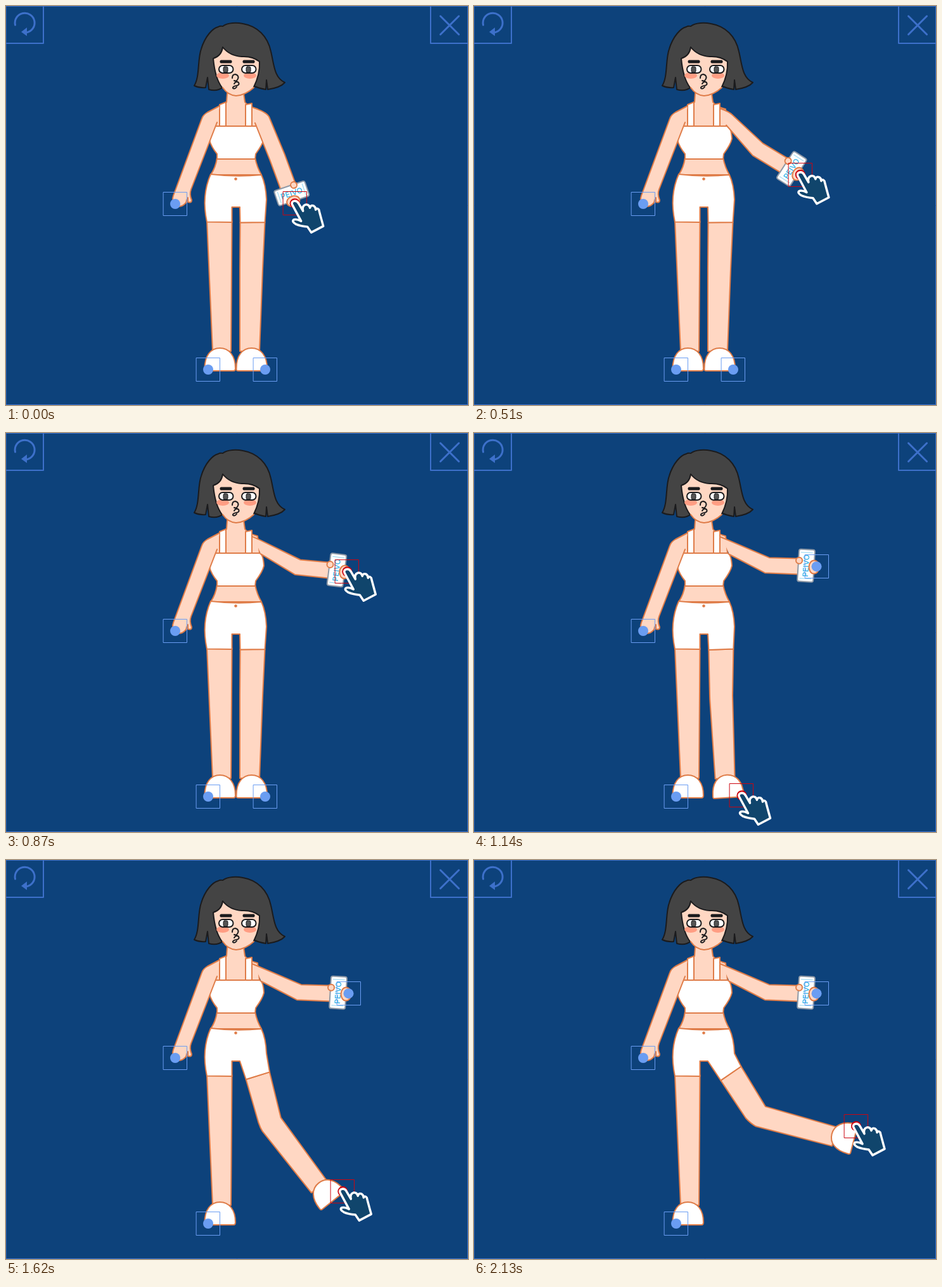
Write an HTML page with a canvas that moves like this. It is 729 px wide and 631 px high and loops after 2580 ms.

```html
<!DOCTYPE html>
<html lang="en">
<head>
<meta charset="utf-8">
<title>Drag the pose</title>
<style>
html, body { margin: 0; width: 100%; height: 100%; overflow: hidden; background: #0d427b; }
canvas { display: block; }
</style>
</head>
<body>
<canvas id="stage" width="729" height="631"></canvas>
<script>
const ctx = document.getElementById('stage').getContext('2d');
const LOOP = 2580, STEP = 30;
const BG = '#0d427b', FRAME = '#3d70ca', LINE = '#df7c48', SKIN = '#ffd7c3';
const HAIR = '#444', INK = '#1b1b1d', BLUE = '#6a9df2', RED = '#cc0510';

// time, first joint angle, second joint angle (degrees)
const ARM = [[0, 67.3, 69.3], [510, 48.9, 30.8], [870, 33.7, 5.1], [960, 30.8, 1.45]];
const LEG = [[1080, 0, 0], [1320, 6.7, 15.4], [1620, 16.5, 38.5], [1890, 25.2, 58.5], [2130, 33.9, 75.5]];
const SHOULDER = [400, 172], UPPER = 72.6, FORE = 78.2;
const HIP = [389.5, 313], KNEE = [387.5, 420], FOOT = [409, 575];

const rad = d => d * Math.PI / 180;
const mix = (a, b, k) => a + (b - a) * k;
const mixPt = (p, q, k) => [mix(p[0], q[0], k), mix(p[1], q[1], k)];

function polar(p, r, deg) {
  return [p[0] + r * Math.cos(rad(deg)), p[1] + r * Math.sin(rad(deg))];
}

function turn(p, from, to, deg) {
  const x = p[0] - from[0], y = p[1] - from[1], c = Math.cos(rad(deg)), s = Math.sin(rad(deg));
  return [to[0] + x * c - y * s, to[1] + x * s + y * c];
}

function pose(keys, t) {
  let i = 0;
  while (i < keys.length - 2 && t > keys[i + 1][0]) i++;
  const a = keys[i], b = keys[i + 1];
  const k = Math.min(1, Math.max(0, (t - a[0]) / (b[0] - a[0])));
  return [mix(a[1], b[1], k), mix(a[2], b[2], k)];
}

function paint(d, fill, line, width = 2) {
  const p = typeof d === 'string' ? new Path2D(d) : d;
  if (fill) { ctx.fillStyle = fill; ctx.fill(p); }
  if (line) { ctx.strokeStyle = line; ctx.lineWidth = width; ctx.stroke(p); }
}

function oval(x, y, rx, ry, fill, line, width) {
  const p = new Path2D();
  p.ellipse(x, y, rx, ry, 0, 0, 7);
  paint(p, fill, line, width);
}

function box(x, y, w, h, r, fill, line, width) {
  const p = new Path2D();
  p.roundRect(x, y, w, h, r);
  paint(p, fill, line, width);
}

function poly(points) {
  const p = new Path2D();
  points.forEach(q => p.lineTo(q[0], q[1]));
  return p;
}

function place(x, y, deg, draw) {
  ctx.save();
  ctx.translate(x, y);
  ctx.rotate(rad(deg));
  draw();
  ctx.restore();
}

function drawFrame() {
  ctx.fillStyle = BG;
  ctx.fillRect(0, 0, 729, 631);
  ctx.strokeStyle = FRAME;
  ctx.lineWidth = 1;
  ctx.strokeRect(.5, .5, 728, 630);
  paint('M0 59H59V0M670 0V59H729', null, FRAME);
  paint('M14.5 30A15.5 15.5 0 1 1 32 42', null, FRAME, 3);
  paint('M24 41L33 34V47.500Z', FRAME);
  paint('M685.500 16L714.500 45M714.500 16L685.500 45', null, FRAME, 3);
}

function drawHead() {
  paint('M297 126C306 112 302 84 308 68C314 48 326 35 335 33C338 31 340 32 342 32C350 26 364 26 374 28' +
    'C397 32 413 48 418 72C423 93 423 113 440 121Q433 129 413 132L411 117L410 132Q398 130 390 126' +
    'L343 128Q333 136 320 132L318 113L315 129Q305 130 297 126Z', HAIR, INK);
  const top = 'M341 129Q330 115 327 83Q340 79 342 65Q353 79 372 80Q389 79 400 88Q401 108 391 128';
  paint(top + 'Q379 142 363 142Q349 140 341 129Z', SKIN);
  paint(top, null, INK);
  paint('M342 129Q350 141 363 142Q378 141 391 129', null, LINE);
  for (const x of [347, 383]) {
    box(x - 9.500, 85.500, 19, 5, 2, INK);
    oval(x < 360 ? 342 : 385, 110, 10, 5, '#ff9d83');
    box(x - 11, 94, 22.500, 12, 6, '#fff', INK, 2);
    box(x - 4, 96, 7, 9, 2, '#555', INK, 1);
  }
  paint('M357 114Q357 108 362 108Q368 110 366 115Q364 120 360 118' +
    'M360 123Q363 118 367 121Q369 125 364 126Q357 127 358 130Q361 132 364 128', null, INK, 2);
}

function drawTorso() {
  paint('M349 138L348 152Q340 158 330 163L324 190H400L397 163Q382 159 377 152L375 138Z', SKIN, LINE);
  for (const x of [337, 378]) paint(`M${x} 156V191H${x + 10}V${x < 350 ? 152 : 154}Z`, '#fff', LINE);
  paint('M333 240Q331 255 323 267H403Q396 255 393 240Z', SKIN, LINE);
  paint('M330 190H400Q406 192 407 210Q405 219 394 234L393 242H333V234Q324 223 321 212Z', '#fff', LINE);
}

function drawLeftArm() {
  const d = 'M337 158L318 168Q311 172 309 178L264 300Q261 308 267 314Q275 321 284 311Q285 306 287 303' +
    'L287 310Q293 312 293 307Q289 298 292 290L333 184';
  paint(d, SKIN, LINE);
}

function shoe(dx, dy) {
  ctx.save();
  ctx.translate(dx, dy);
  paint('M363.500 573Q363 577 366 577H409Q412 577 412 573C412 553 402 541 387.500 541' +
    'C373 541 363.500 553 363.500 573Z', '#fff', LINE);
  ctx.restore();
}

function drawLegs([thigh, shin]) {
  paint('M317 340L326 546H355L356.500 340Z', SKIN, LINE);
  shoe(-50, 0);
  const knee = turn(KNEE, HIP, HIP, -thigh);
  const upper = (x, y) => turn([x, y], HIP, HIP, -thigh);
  const lower = (x, y) => turn([x, y], KNEE, knee, -shin);
  const hemOut = upper(408.500, 342), hemIn = upper(369.500, 342.500);
  const leg = poly([hemOut, upper(405, 416), lower(400, 546), lower(369, 546), lower(369, 422)]);
  leg.quadraticCurveTo(...mixPt(upper(369, 420), lower(369, 418), .5), ...upper(369, 414));
  leg.lineTo(...hemIn);
  leg.closePath();
  paint(leg, SKIN, LINE);
  place(knee[0], knee[1], -shin, () => shoe(-KNEE[0], -KNEE[1]));
  const shorts = new Path2D('M356.500 318V342L317 341.500Q308 300 323 266Q363 271 403 267Q410 282 411 306');
  shorts.lineTo(...hemOut);
  shorts.lineTo(...hemIn);
  shorts.lineTo(369, 318);
  shorts.closePath();
  paint(shorts, '#fff', LINE);
  oval(362.500, 273.500, 2.300, 2.300, LINE);
  return lower(...FOOT);
}

function drawPhoneHand() {
  place(-16.500, -1, 2, () => {
    box(-12.500, -25.500, 25, 51, 3, '#fff', '#8f99a6', 2);
    paint('M-9 -20.500H9M-9 20.500H9', null, '#8fd6f2', 1);
    place(0, 0, -90, () => {
      ctx.fillStyle = '#2fb0e6';
      ctx.font = '500 12px Inter, sans-serif';
      ctx.textAlign = 'center';
      ctx.textBaseline = 'middle';
      ctx.fillText('PEIVO', 0, .5);
    });
  });
  oval(-27.700, -8.800, 5, 5, SKIN, LINE);
  oval(-4, 1, 8, 10.500, SKIN, LINE);
}

function drawRightArm([a, b]) {
  const elbow = polar(SHOULDER, UPPER, a), hand = polar(elbow, FORE, b);
  const k = (67.3 - a) / 36.5, bend = (a + b) / 2;
  const local = (x, y) => turn([x, y], [0, 0], hand, b);
  const round = mixPt([415, 175], [400, 169], k);
  const arm = new Path2D('M388 158');
  arm.lineTo(388, mix(160, 164, k));
  arm.quadraticCurveTo(...mixPt([410, 167], [394, 166.500], k), ...round);
  arm.lineTo(...polar(elbow, 12.500, bend - 90));
  arm.lineTo(...local(-29, -12));
  arm.lineTo(...local(-18, 0));
  arm.lineTo(...local(-27, 13));
  arm.lineTo(...polar(elbow, 12.500, bend + 90));
  arm.lineTo(...mixPt([393, 185], [403, 192], k));
  paint(arm, SKIN, LINE);
  place(hand[0], hand[1], b, drawPhoneHand);
  return hand;
}

function handle([x, y], active) {
  const color = active ? RED : BLUE;
  ctx.strokeStyle = color;
  ctx.lineWidth = 1;
  ctx.strokeRect(Math.round(x) - 18.500, Math.round(y) - 18.500, 37, 37);
  oval(x, y, 8, 8, color);
}

function cursor([x, y]) {
  place(x, y, 0, () => paint('M-4 2Q-6 -3 0 -4Q4 -4 6 0L13 12Q11 4 17 2Q22 1 24 7Q25 2 30 4Q33 6 33 10' +
    'Q35 6 38 10Q40 18 45 36L26 46L20 37Q9 36 2 33Q-5 29 -2 26Q2 24 10 28Z', '#10456c', '#fff', 3.500));
}

function render(t) {
  drawFrame();
  drawTorso();
  const foot = drawLegs(pose(LEG, t));
  drawLeftArm();
  const hand = drawRightArm(pose(ARM, t));
  drawHead();
  handle([267, 313]);
  handle([319, 575]);
  handle(hand, t <= 960);
  handle(foot, t > 1080);
  const k = Math.min(1, Math.max(0, (t - 960) / 120));
  cursor(mixPt(hand, foot, k));
}

ctx.lineJoin = 'round';
ctx.lineCap = 'round';
const start = performance.now();
function tick() {
  const t = (performance.now() - start) % LOOP;
  render(Math.floor(t / STEP) * STEP);
  requestAnimationFrame(tick);
}
tick();
</script>
</body>
</html>
```
